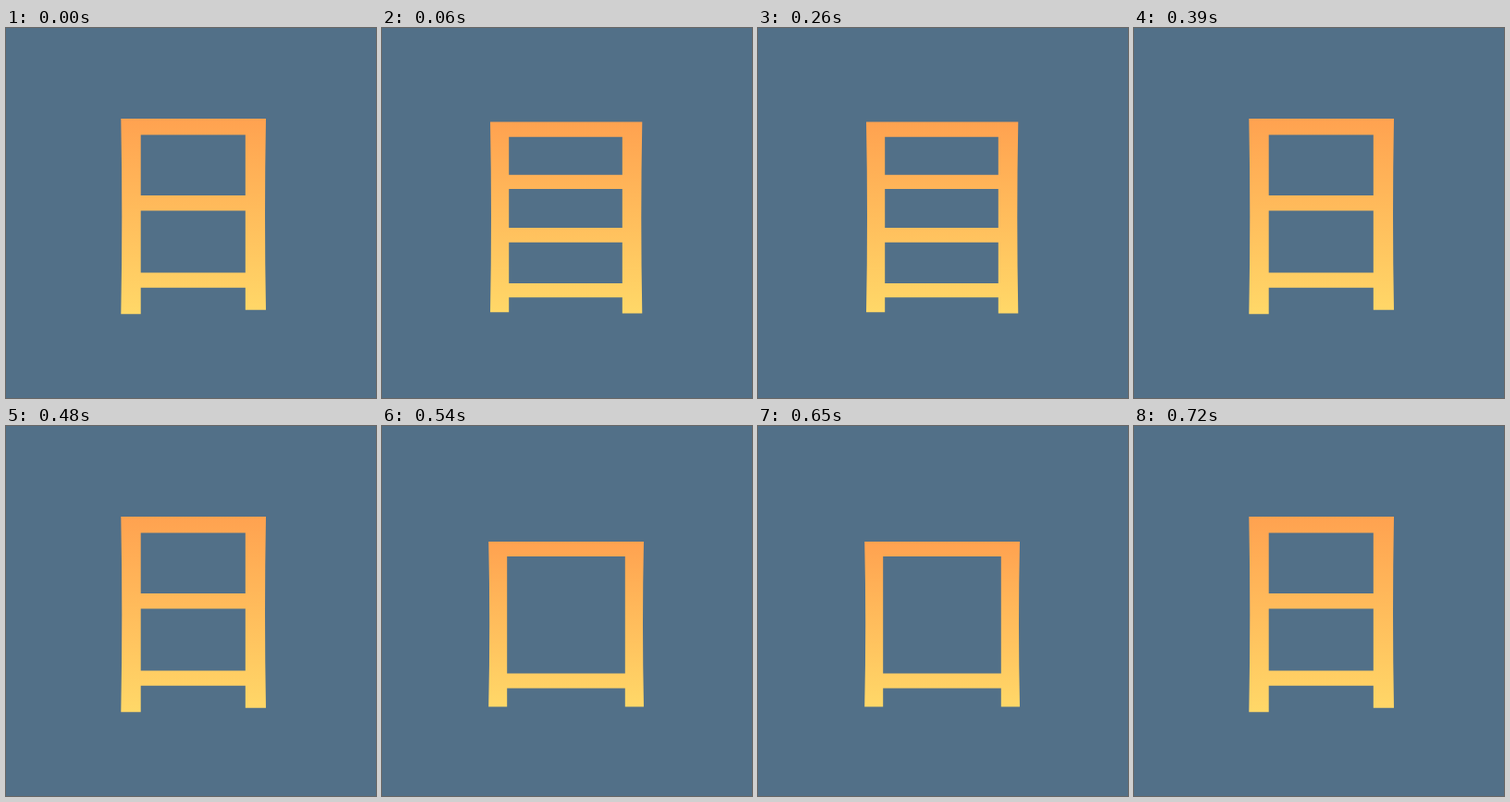
Recreate the animation shown at these times as an HTML page. Size 400 px wide and 400 px high, loop 840 ms.

```html
<!DOCTYPE html>
<html lang="en">
<head>
<meta charset="utf-8">
<title>Boxes</title>
<style>
  html, body { margin: 0; width: 100%; height: 100%; overflow: hidden; background: #527088; }
  svg { display: block; width: 100%; height: 100%; }
  path { fill: url(#warm); fill-rule: evenodd; opacity: 0; }
</style>
</head>
<body>
<svg id="stage" viewBox="0 0 400 400">
  <defs>
    <linearGradient id="warm" x1="0" y1="0" x2="0" y2="1">
      <stop offset="0" stop-color="#ffa250"/>
      <stop offset="1" stop-color="#ffd868"/>
    </linearGradient>
  </defs>
</svg>
<script>
const LOOP = 840;

// x: outer left, inner left, inner right, outer right
// holes: top and bottom of each window; bar: underside of the lowest bar
// feet: bottoms of the left and right legs
const shapes = {
  two: { x: [124.3, 145.7, 258.8, 281], top: 98, holes: [[115.5, 181], [197.5, 264.5]], bar: 280.8, feet: [309.2, 304.7] },
  three: { x: [117, 137.2, 259.8, 281.3], top: 101.5, holes: [[117.7, 158.7], [174, 216], [231.7, 276]], bar: 291.3, feet: [307.3, 308.5] },
  one: { x: [115.2, 135.2, 262.8, 283], top: 125, holes: [[141, 267.5]], bar: 283.5, feet: [303.5, 303.5] }
};

const steps = [[0, 'two'], [60, 'three'], [390, 'two'], [540, 'one'], [720, 'two']];

// The outer sides bend slightly inwards.
function outline({ x: [l, il, ir, r], top, holes, bar, feet: [fl, fr] }) {
  const mid = (top + fl) / 2, bend = 2;
  const frame = `M${l} ${top}H${r}Q${r - bend} ${mid} ${r} ${fr}H${ir}V${bar}H${il}V${fl}H${l}Q${l + bend} ${mid} ${l} ${top}Z`;
  return frame + holes.map(([a, b]) => `M${il} ${a}H${ir}V${b}H${il}Z`).join('');
}

const stage = document.getElementById('stage');
for (const [name, shape] of Object.entries(shapes)) {
  const path = document.createElementNS('http://www.w3.org/2000/svg', 'path');
  path.setAttribute('d', outline(shape));
  stage.append(path);
  const frames = [...steps, [LOOP, steps[0][1]]].map(([at, shown]) => ({
    offset: at / LOOP,
    opacity: shown === name ? 1 : 0,
    easing: 'steps(1, end)'
  }));
  const anim = path.animate(frames, { duration: LOOP, iterations: Infinity });
  anim.startTime = 0;
}
</script>
</body>
</html>
```
